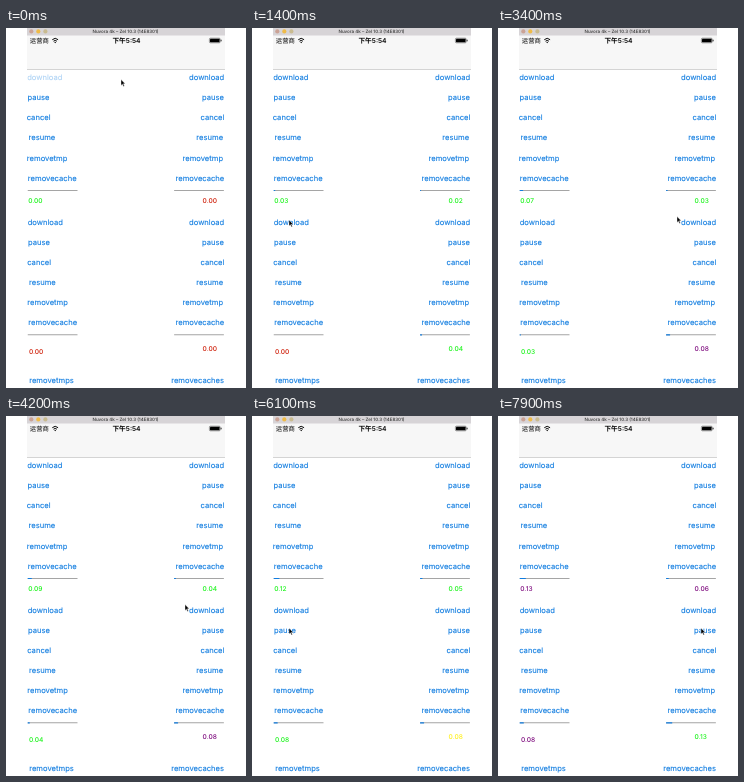
An HTML page for the animation above (8000 ms loop, 240 by 360 pixels).

```html
<!DOCTYPE html>
<html lang="en">
<head>
<meta charset="utf-8">
<style>
html, body { margin: 0; width: 100%; height: 100%; overflow: hidden; background: #fff; }
svg { display: block; width: 240px; height: 360px; text-rendering: geometricPrecision; font-family: Inter, "Noto Sans CJK SC", "Noto Sans CJK", sans-serif; }
.link { font-size: 7.62px; fill: #117de0; stroke: #117de0; stroke-width: .12px; }
.value { font-size: 6.6px; font-weight: 500; }
</style>
</head>
<body>
<svg viewBox="0 0 240 360">
  <rect x="21" width="198" height="41" fill="#f7f7f7"/>
  <rect x="21" width="198" height="7.5" fill="#d7d4d7"/>
  <rect x="21" y="41" width="198" height=".6" fill="#b8b8b8"/>
  <circle cx="25.3" cy="3.4" r="2.1" fill="#cba396"/>
  <circle cx="32.3" cy="3.4" r="2.1" fill="#efbb48"/>
  <circle cx="39.4" cy="3.4" r="2.1" fill="#c9bb90"/>
  <text x="119.5" y="5" font-size="4.5" font-weight="500" text-anchor="middle" fill="#333">Nuvora 4k – Zel 10.3 (14E8301)</text>
  <text x="23.8" y="15" font-size="6.4">运营商</text>
  <path d="M46.3 11.7Q49.2 8.9 52.1 11.7M47.5 13.2Q49.2 11.6 50.9 13.2" fill="none" stroke="#000"/>
  <path d="M48.3 14.2Q49.2 13.4 50.1 14.2L49.2 15.2Z"/>
  <text x="120.5" y="15" font-size="6.7" font-weight="600" text-anchor="middle">下午5:54</text>
  <rect x="203.4" y="10.2" width="10.8" height="4.6" rx="1" fill="none" stroke="#000" stroke-width=".4"/>
  <rect x="204" y="10.8" width="9.6" height="3.4" rx=".4"/>
  <rect x="214.7" y="11.6" width=".8" height="1.8" rx=".4"/>
  <g id="panels"></g>
  <path id="cursor" d="M0 0V5.9L1.4 4.7L2.4 6.9L3.4 6.5L2.4 4.3H4.2Z" stroke="#fff" stroke-width=".4"/>
</svg>
<script>
const LOOP = 8000, STEP = 100;
const RELEASE = 50, FADE = 120, CONNECT = 200, SLOTS = 3;
const COLORS = { idle: '#d0240f', waiting: '#fff020', running: '#1cf41c', paused: '#800f80' };
const DOWNLOAD = 0, PAUSE = 1;
const root = document.getElementById('panels');
const cursor = document.getElementById('cursor');

function add(tag, attrs, text = '') {
  const el = document.createElementNS('http://www.w3.org/2000/svg', tag);
  for (const key in attrs) el.setAttribute(key, attrs[key]);
  el.textContent = text;
  return root.appendChild(el);
}

function link(text, x, y, right) {
  return add('text', { class: 'link', x, y, 'text-anchor': right ? 'end' : 'start' }, text);
}

// label, left indent, right indent
const buttons = [
  ['download', .2, 0], ['pause', .6, .3], ['cancel', -.3, 0],
  ['resume', 1.5, 1.2], ['removetmp', -.2, 1.2], ['removecache', .8, 0]
];
const rowY = (bottom, row) => 52 + 144.5 * bottom + 20.15 * row;

const panels = [.0283, .0183, .0305, .066].map((speed, i) => {
  const right = i % 2, bottom = i >> 1;
  const links = buttons.map(([text, left, end], row) =>
    link(text, right ? 218.3 - end : 21 + bottom / 2 + left, rowY(bottom, row), right));
  const x = right ? 168 : 21.6, y = 162 + 144.3 * bottom;
  add('rect', { x, y, width: 50, height: 1, rx: .5, fill: '#a5a5a5' });
  const bar = add('rect', { x, y: y - .1, height: 1.2, rx: .5, fill: '#117de0' });
  const label = add('text', {
    class: 'value', x: right ? 196.6 : 22.2 + bottom * .7, y: bottom ? 325.8 - 2.6 * right : 175.2
  });
  return { speed, power: right ? .6 : .8, right, bottom, links, bar, label };
});
link('removetmps', 23.2, 354.5);
link('removecaches', 218, 354.5, true);

const [topLeft, topRight, bottomLeft, bottomRight] = panels;
const click = (at, panel, row) =>
  ({ at, panel, row, x: panel.right ? 203 : 37, y: rowY(panel.bottom, row) - 4.5 });

const clicks = [
  click(-50, topLeft, DOWNLOAD),
  click(350, topRight, DOWNLOAD),
  click(700, bottomRight, DOWNLOAD),
  click(1450, bottomLeft, DOWNLOAD),
  click(2350, bottomRight, PAUSE),
  click(5450, bottomRight, DOWNLOAD),
  click(6150, bottomLeft, PAUSE),
  click(6650, topLeft, PAUSE),
  click(7150, topRight, PAUSE),
  click(7950, bottomRight, PAUSE)
];
const rests = [{ at: 0, x: 115, y: 51.5 }, { at: 3400, x: 179, y: 188.5 }, { at: 5000, x: 178.5, y: 176.5 }];
const stops = [...clicks, ...rests].sort((a, b) => a.at - b.at);

// Replays the clicks; waiting downloads start when a slot is free.
function replay(t) {
  for (const p of panels) Object.assign(p, { state: 'idle', active: 0, since: 0 });
  const activeAt = (p, time) =>
    p.active + (p.state === 'running' ? Math.max(0, time - p.since - CONNECT) : 0);
  for (const { at, panel, row } of clicks) {
    const time = at + RELEASE;
    if (time > t) break;
    panel.active = activeAt(panel, time);
    panel.state = row === DOWNLOAD ? 'waiting' : 'paused';
    const next = panels.find(p => p.state === 'waiting');
    if (next && panels.filter(p => p.state === 'running').length < SLOTS)
      Object.assign(next, { state: 'running', since: time });
  }
  for (const p of panels) p.value = p.speed * (activeAt(p, t) / 1000) ** p.power;
}

function moveCursor(t) {
  const i = stops.findIndex(s => s.at > t);
  const to = stops[i < 0 ? stops.length - 1 : i], from = stops[i < 1 ? 0 : i - 1];
  const arrive = to.at - 50;
  const leave = Math.min(arrive - 1, Math.max(from.at + 50, arrive - 500));
  const u = Math.min(1, Math.max(0, (t - leave) / (arrive - leave)));
  const k = u * u * (3 - 2 * u);
  cursor.setAttribute('transform',
    `translate(${from.x + (to.x - from.x) * k} ${from.y + (to.y - from.y) * k})`);
}

function draw(t) {
  replay(t);
  for (const p of panels) {
    p.label.textContent = p.value.toFixed(2);
    p.label.setAttribute('fill', COLORS[p.state]);
    p.bar.setAttribute('width', p.value > 0 ? Math.max(1.2, p.value * 50) : 0);
    for (const el of p.links) el.setAttribute('opacity', 1);
  }
  for (const { at, panel, row } of clicks) {
    const age = (t - at) / FADE;
    if (age >= 0 && age < 1) panel.links[row].setAttribute('opacity', .2 + .8 * age * age);
  }
  moveCursor(t);
}

const start = performance.now();
function tick() {
  const t = (performance.now() - start) % LOOP;
  draw(Math.floor(t / STEP) * STEP);
  requestAnimationFrame(tick);
}
tick();
</script>
</body>
</html>
```
